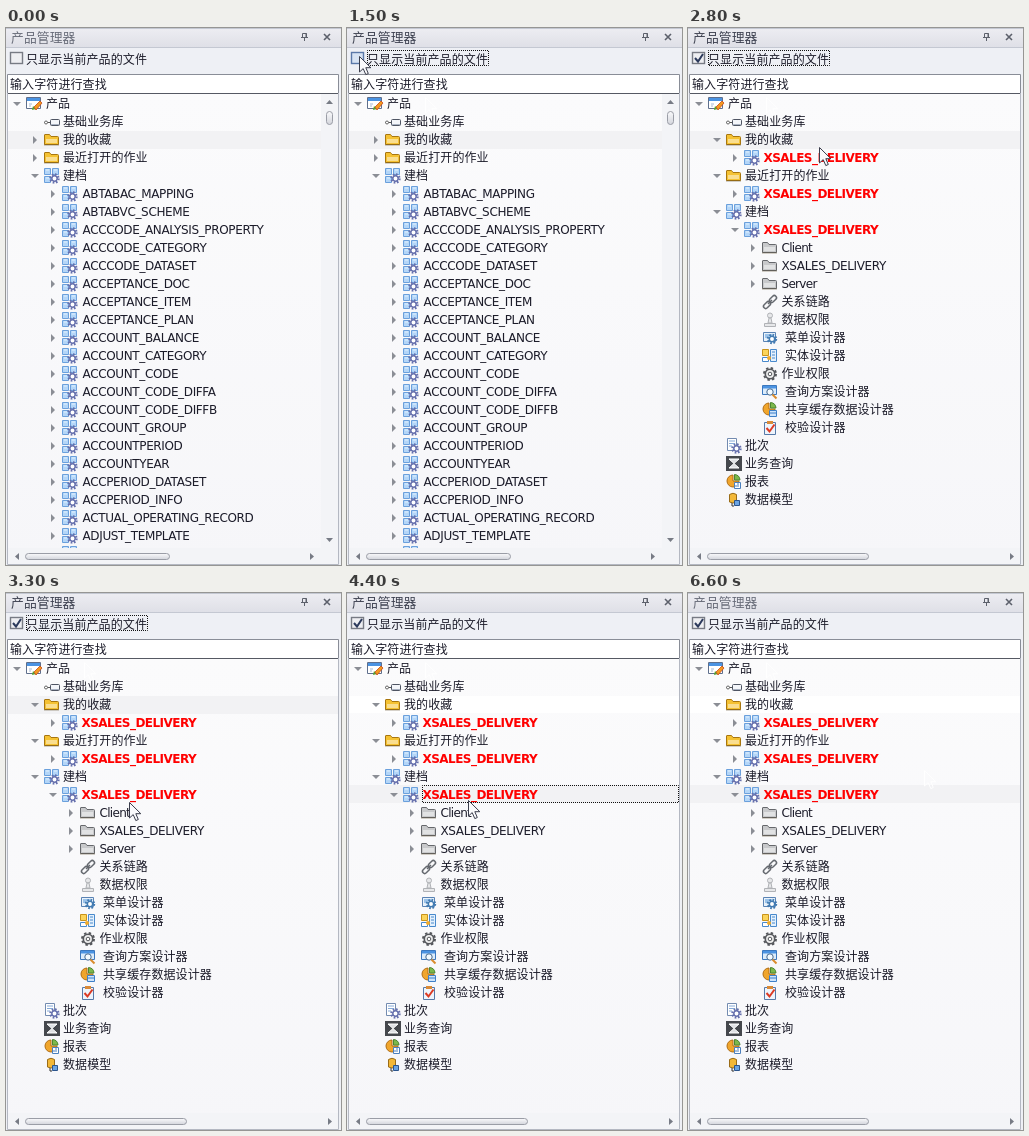
Write an HTML page that moves like this. It is 335x537 px and loops after 6.7 s.

```html
<!DOCTYPE html>
<html lang="zh-CN">
<head>
<meta charset="utf-8">
<style>
html, body { margin: 0; width: 100%; height: 100%; overflow: hidden; background: #eef0f5 }
svg { display: block; width: 335px; height: 537px }
text { font: 12px "DejaVu Sans", "Noto Sans CJK SC", "Noto Sans CJK", sans-serif; fill: #1c1c2a; white-space: pre }
.cjk { font-family: "Noto Sans CJK SC", "Noto Sans CJK", sans-serif; letter-spacing: .1px }
.caps { letter-spacing: -.36px }
.low { letter-spacing: -.7px }
.red { font-weight: bold; fill: #f00; letter-spacing: -.54px }
.dots { fill: none; stroke: #111; stroke-dasharray: 1; stroke-dashoffset: .5 }
</style>
</head>
<body>
<svg viewBox="0 0 335 537">
<defs>
  <linearGradient id="bar" x2="0" y2="1"><stop stop-color="#ededf2"/><stop offset="1" stop-color="#dfe0e7"/></linearGradient>
  <linearGradient id="sheet" x2="0" y2="1"><stop stop-color="#fbfbfc"/><stop offset="1" stop-color="#f6f6f9"/></linearGradient>
  <linearGradient id="thumb" x2="0" y2="1"><stop stop-color="#fafafc"/><stop offset="1" stop-color="#d3d5dc"/></linearGradient>
  <clipPath id="view"><path d="M2 66H332V520H2Z"/></clipPath>
  <path id="arrow" d="M.5 .5V16L4.2 12.6 6.8 18.6 9.3 17.5 6.8 11.7H11.8Z"/>
  <g id="gear">
    <circle r="4" fill="none" stroke="currentColor" stroke-width="2.4" stroke-dasharray="1.6 1.54"/>
    <circle r="2.7" fill="#fff" stroke="currentColor" stroke-width="1.5"/>
  </g>
  <g id="pie">
    <path d="M7 1A6 6 0 1 0 13 7H7Z" fill="#f0a52c" stroke="#b06d14"/>
    <path d="M8.5 .5A6 6 0 0 1 14 6H8.5Z" fill="#7cb84c" stroke="#4c8530"/>
  </g>
  <g id="table">
    <path d="M.5 .5h6v6h-6zM8.5 .5h6v6h-6zM.5 8.5h6v6h-6z" fill="#b4d6f8" stroke="#6ba0dc"/>
    <path d="M2 2h3M10 2h3M2 10h3" stroke="#e4f3ff"/>
    <use href="#gear" x="10.5" y="10.5" color="#6670ad"/>
  </g>
  <g id="product">
    <path d="M.5 1.5h14v11h-14z" fill="#fff" stroke="#5f6f8c"/>
    <path d="M1 2h13v3H1z" fill="#4b93e2"/>
    <path d="M6 14l1-4 3 3z" fill="#55a52f"/>
    <path d="M8 11L14 5l2 2-6 7z" fill="#f39a1e" stroke="#c8481c" stroke-width=".8"/>
    <path d="M3 8h3M3 10h2" stroke="#a6b9d4"/>
  </g>
  <g id="plug">
    <path d="M0 8.5h6" stroke="#555"/><circle cx="2" cy="8.5" r="1.5" fill="#fff" stroke="#666"/>
    <rect x="6.5" y="5.5" width="9" height="6" rx="1" fill="#f4f6fa" stroke="#4f5563"/>
    <path d="M7 10.500h8" stroke="#a9b2c2"/>
  </g>
  <g id="dir">
    <path d="M.5 12.5V3q0-.5 .5-.5H5.5l1.500 2h6.500q1 0 1 1V12.500Z"/>
    <path d="M2 7h11v4H2z" fill="#fff" stroke="none" opacity=".45"/>
    <path d="M0 13h15" stroke="#5c4a2a" opacity=".5"/>
  </g>
  <g id="folder"><use href="#dir" fill="#f5c233" stroke="#a8760f"/></g>
  <g id="grey"><use href="#dir" fill="#c8c9cb" stroke="#66686c"/></g>
  <g id="link" fill="none" stroke="#65696f" stroke-width="1.5">
    <rect x="-4" y="-2.2" width="8" height="4.4" rx="2.2" transform="translate(5 11) rotate(-45)"/>
    <rect x="-4" y="-2.2" width="8" height="4.4" rx="2.2" transform="translate(11 5) rotate(-45)"/>
    <path d="M6 10l4-4"/>
  </g>
  <g id="stamp" fill="#e6e7e9" stroke="#b0b2b6">
    <circle cx="8" cy="3.5" r="2.5"/><path d="M7 6h2l1 5H6zM2.5 11.5h11v3h-11z"/>
  </g>
  <g id="menu">
    <path d="M1.5 2.5h12v9h-12z" fill="#e9f2fb" stroke="#5a83b4"/>
    <path d="M3 5h7M3 7h4" stroke="#4e94d8"/>
    <use href="#gear" x="10" y="9" color="#427bb2"/>
  </g>
  <g id="entity">
    <path d="M.5 1.5h6v6h-6z" fill="#fbd45a" stroke="#c8931c"/>
    <path d="M8.5 1.5h6v12h-6z" fill="#e4f0fc" stroke="#4889cc"/>
    <path d="M10 4h3M10 7h3M10 10h3" stroke="#4889cc"/>
    <path d="M.5 9.5h6v4h-6z" fill="#fff" stroke="#4889cc"/>
    <circle cx="7" cy="10" r="2" fill="#f2ab2a"/>
  </g>
  <g id="cog">
    <circle cx="8" cy="8" r="6" fill="none" stroke="#55575c" stroke-width="2" stroke-dasharray="2.4 2.312"/>
    <circle cx="8" cy="8" r="4.7" fill="#eee" stroke="#55575c" stroke-width="1.6"/>
    <circle cx="8" cy="8" r="1.8" fill="#fff" stroke="#55575c"/>
  </g>
  <g id="query">
    <path d="M.5 1.5h14v9h-14z" fill="#dcecfb" stroke="#3c78be"/>
    <path d="M1 2h13v2.5H1z" fill="#4b93e2"/>
    <circle cx="8" cy="8" r="3.2" fill="#f3faff" stroke="#44688f"/>
    <path d="M10.5 10.5l4 4" stroke="#d98b2b" stroke-width="2"/>
  </g>
  <g id="share"><use href="#pie"/><path d="M7.5 8.5h7v6h-7z" fill="#cfe4fa" stroke="#3d7fc8"/><path d="M8 11h6" stroke="#3d7fc8"/></g>
  <g id="check">
    <path d="M2.5 2.5h11v12h-11z" fill="#eef4fc" stroke="#5679a8"/>
    <path d="M5 1h6v3H5z" fill="#d98a38"/>
    <path d="M4.5 8l3 3.5 5-7" fill="none" stroke="#dc3a24" stroke-width="2"/>
  </g>
  <g id="batch">
    <path d="M1.5 .5h9v12h-9z" fill="#fff" stroke="#738bb0"/>
    <path d="M3 3h6M3 5.5h6M3 8h3" stroke="#85a9d8"/>
    <use href="#gear" x="10.5" y="10.5" color="#6670ad"/>
  </g>
  <g id="glass">
    <path d="M0 0h16v15H0z" fill="#45484d"/>
    <path d="M3 3h10L8 7.5 13 12H3l5-4.500z" fill="#dfe1e4" stroke="#fff"/>
  </g>
  <g id="report"><use href="#pie"/><path d="M8.5 8.5h6v6h-6z" fill="#fff" stroke="#4b7fbd"/><path d="M10 13v-2M12 13v-4" stroke="#4b7fbd"/></g>
  <g id="model">
    <path d="M3.5 2.5Q7 0 10.5 2.5V10Q7 12 3.5 10Z" fill="#f3b838" stroke="#9a6c18"/>
    <path d="M8.5 8.5h5v5h-5z" fill="#6ba4e4" stroke="#2b548c"/>
    <path d="M6 11v3h2" fill="none" stroke="#333"/>
  </g>
</defs>

<path d="M0 0H335V537H0Z" fill="#eef0f5"/>
<path d="M0 0H335V19H0Z" fill="url(#bar)"/>
<path d="M0 .5H335M0 19.5H335" stroke="#c4c8d2"/>
<text id="title" class="cjk" x="5" y="14" style="font-size:12.8px">产品管理器</text>
<path d="M296.5 5.5h4v4h-4zM295 9.5h7M298.5 10v3M300 5v5" fill="none" stroke="#5c606b"/>
<path d="M318 6l6 6m0-6l-6 6" stroke="#5c606b" stroke-width="1.6"/>

<rect id="box" x="4.5" y="24.5" width="12" height="11" stroke-width="1.4"/>
<path id="tick" d="M7 30l3 3.5 5-7.5" fill="none" stroke="#2c3a5c" stroke-width="2"/>
<text class="cjk" x="20" y="35.5">只显示当前产品的文件</text>
<path id="labelFocus" class="dots" d="M20.5 22.5H141.5V37.5H20.5Z"/>

<path d="M1.5 46.5H332.5V65.5H1.5Z" fill="#fff" stroke="#898d97"/>
<text class="cjk" x="4" y="61">输入字符进行查找</text>
<path d="M1.5 65.5H332.5V536.5H1.5Z" fill="url(#sheet)" stroke="#b4b8c2"/>
<path d="M2 65.5H332" stroke="#555963"/>
<path id="oldRow" d="M2 103H332V120H2Z" fill="#fff"/>
<path id="hotRow" d="M2 0H332V18H2Z" fill="#f2f2f4"/>
<g id="all" clip-path="url(#view)"></g>
<g id="mine" clip-path="url(#view)"></g>
<g id="allBars"></g>
<g id="mineBars"></g>
<path id="rowFocus" class="dots" d="M75.5 192.5H331.5V209.5H75.5Z"/>
<use id="trail" href="#arrow" x="78" y="69" fill="none" stroke="#fff"/>
<use id="trail2" href="#arrow" x="236" y="177" fill="none" stroke="#fff"/>
<g id="tip">
  <path d="M123 243H164V268H123Z" opacity=".3"/>
  <path d="M121.5 240.5H161.5V265.5H121.5Z" fill="#f8f8fb" stroke="#767676"/>
  <text class="low" x="126.5" y="258" style="fill:#55565c">Client</text>
</g>
<use id="cursor" href="#arrow" fill="#fafafc" stroke="#3a3d4c"/>
</svg>

<script>
const $ = id => document.getElementById(id);
const LOOP = 6700;

// Each row: level, icon, arrow (v open, > closed, - none), label
const head = ['0 product v 产品', '1 plug - 基础业务库'];
const tables = `ABTABAC_MAPPING ABTABVC_SCHEME ACCCODE_ANALYSIS_PROPERTY ACCCODE_CATEGORY
 ACCCODE_DATASET ACCEPTANCE_DOC ACCEPTANCE_ITEM ACCEPTANCE_PLAN ACCOUNT_BALANCE ACCOUNT_CATEGORY
 ACCOUNT_CODE ACCOUNT_CODE_DIFFA ACCOUNT_CODE_DIFFB ACCOUNT_GROUP ACCOUNTPERIOD ACCOUNTYEAR
 ACCPERIOD_DATASET ACCPERIOD_INFO ACTUAL_OPERATING_RECORD ADJUST_TEMPLATE ADJUST_TYPE`.split(/\s+/);
const allRows = [...head, '1 folder > 我的收藏', '1 folder > 最近打开的作业', '1 table v 建档',
  ...tables.map(name => '2 table > ' + name)];
const mineRows = [...head,
  '1 folder v 我的收藏', '2 table > XSALES_DELIVERY',
  '1 folder v 最近打开的作业', '2 table > XSALES_DELIVERY',
  '1 table v 建档', '2 table v XSALES_DELIVERY',
  '3 grey > Client', '3 grey > XSALES_DELIVERY', '3 grey > Server',
  '3 link - 关系链路', '3 stamp - 数据权限', '3 menu - 菜单设计器', '3 entity - 实体设计器',
  '3 cog - 作业权限', '3 query - 查询方案设计器', '3 share - 共享缓存数据设计器', '3 check - 校验设计器',
  '1 batch - 批次', '1 glass - 业务查询', '1 report - 报表', '1 model - 数据模型'];

function tree(rows, red) {
  return rows.map((row, i) => {
    const [level, icon, arrow, label] = row.split(' ');
    const y = 76 + 18 * i, left = 18 * level;
    const bold = red && level == 2;
    const style = bold ? 'red' : /[一-龥]/.test(label) ? 'cjk' : /[a-z]/.test(label) ? 'low' : 'caps';
    const x = level == 3 ? (label.endsWith('设计器') ? 97 : 93.5) : [40, 57, bold ? 75.5 : 76.5][level];
    const mark = { v: `M${left + 7} ${y - 2}h8l-4 4z`, '>': `M${left + 9} ${y - 4}v8l4-4z`, '-': '' }[arrow];
    return `<path d="${mark}" fill="#8b8e95"/><use href="#${icon}" x="${20 + left}" y="${y - 8}"/>
      <text class="${style}" x="${x}" y="${y + 4}">${label}</text>`;
  }).join('');
}

function bars(thumbEnd, arrowX, vertical) {
  const thumb = (x, y, w, h) =>
    `<rect x="${x}.5" y="${y}.5" width="${w}" height="${h}" rx="3" fill="url(#thumb)" stroke="#9a9da6"/>`;
  const mark = d => `<path d="${d}" fill="#777b85"/>`;
  return '<path d="M2 520H332V536H2Z" fill="#f3f4f7"/>' + thumb(19, 525, thumbEnd - 20, 6) +
    mark('M13 525v7l-4-3.5z') + mark(`M${arrowX} 525v7l4-3.5z`) +
    (vertical ? '<path d="M315 66H332V520H315Z" fill="#f3f4f7"/>' + thumb(320, 83, 6, 13) +
      mark('M320 76h7l-3.5-4z') + mark('M320 510h7l-3.5 4z') : '');
}

$('all').innerHTML = tree(allRows);
$('mine').innerHTML = tree(mineRows, true);
$('allBars').innerHTML = bars(164, 304, true);
$('mineBars').innerHTML = bars(181, 322);

// Pointer steps: time / 100, x, y
const steps = [[3, 251, 72], [4, 217, 73], [5, 172, 73], [6, 122, 72], [7, 78, 69], [8, 42, 54], [9, 18, 38],
  [10, 17, 36], [11, 15, 31], [12, 12, 28],
  [24, 22, 34], [25, 52, 56], [26, 88, 82], [27, 117, 106], [28, 131, 119], [29, 131, 141], [30, 130, 163],
  [31, 129, 177], [32, 126, 195], [33, 123, 209], [34, 121, 218],
  [40, 121, 212], [41, 121, 207], [55, 165, 196], [56, 236, 177], [57, -50, 0]];

function show(id, on) { $(id).style.display = on ? '' : 'none'; }

function draw(now) {
  const t = now % LOOP;
  const within = (a, b) => t >= a && t < b;
  const checked = t >= 1700, picked = t >= 4300, hover = within(1000, 2400);
  show('all', !checked);
  show('allBars', !checked);
  show('mine', checked);
  show('mineBars', checked);
  show('tick', checked);
  show('labelFocus', within(1400, 4300));
  show('rowFocus', within(4300, 6600));
  show('oldRow', picked);
  $('hotRow').setAttribute('transform', `translate(0 ${picked ? 192 : 103})`);
  show('trail', t >= 800);
  show('trail2', t >= 5700);
  show('tip', within(3500, 4000));
  $('title').style.fill = within(1400, 6600) ? '#3d4150' : '#686c79';
  $('box').setAttribute('fill', within(1400, 1500) ? '#b5cdec' : hover ? '#d7e3f3' : '#eeeff2');
  $('box').setAttribute('stroke', hover ? '#5a78a8' : '#777b84');
  const [, x, y] = steps.findLast(s => s[0] * 100 <= t) || [0, -50, 0];
  $('cursor').setAttribute('x', x);
  $('cursor').setAttribute('y', y);
}

const start = performance.now();
function frame() {
  draw(performance.now() - start);
  requestAnimationFrame(frame);
}
frame();
</script>
</body>
</html>
```
